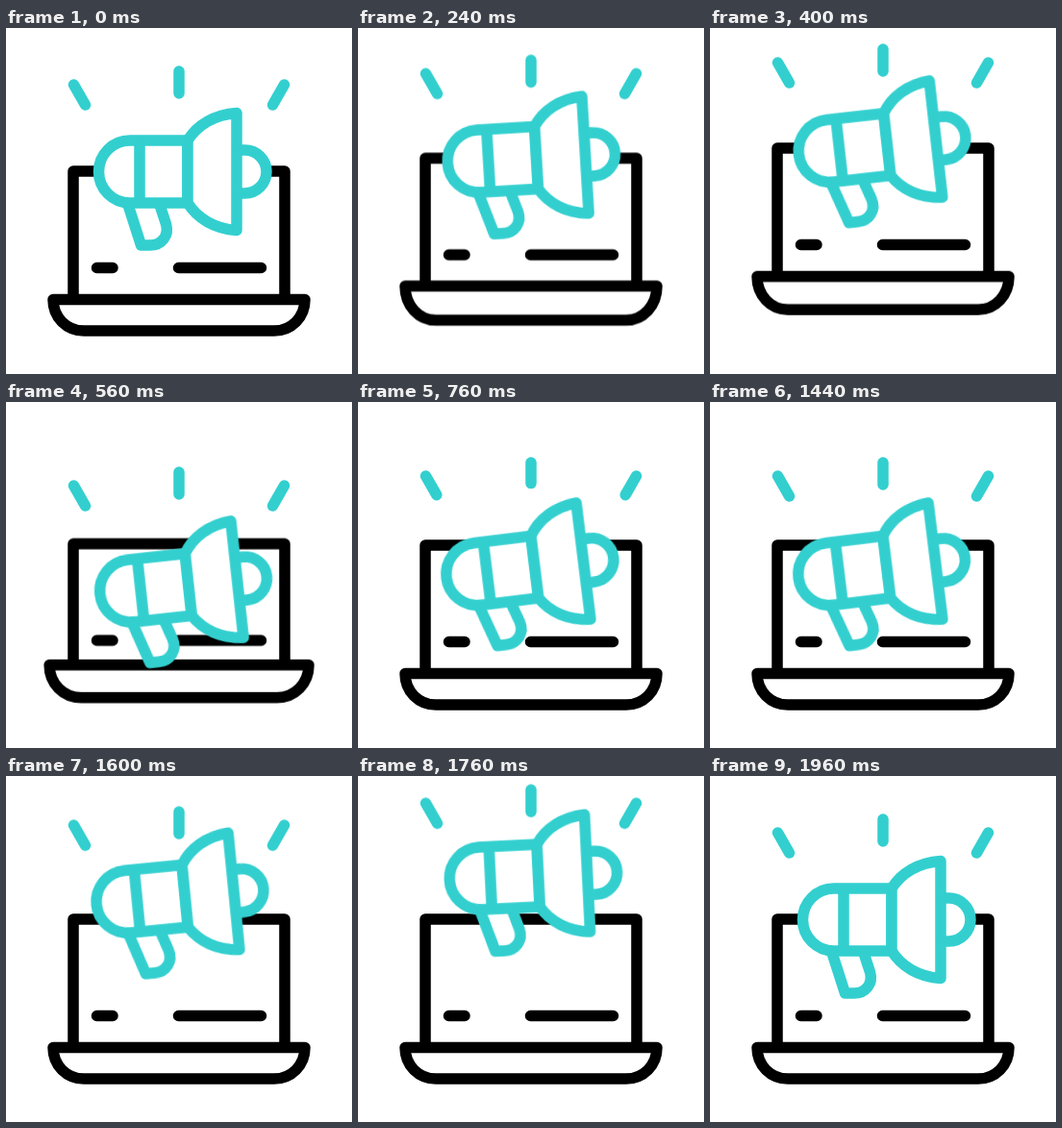
Recreate the animation shown at these times as an HTML page. Size 360 by 360 pixels, loop 2000 ms.

```html
<!DOCTYPE html>
<html lang="en">
<head>
<meta charset="utf-8">
<title>Megaphone and laptop</title>
<style>
  html, body { margin: 0; width: 100%; height: 100%; overflow: hidden; background: #fff; }
  svg { display: block; width: 100vw; height: 100vh; }

  :root {
    --sine: cubic-bezier(.37, 0, .63, 1);
    --in: cubic-bezier(.12, 0, .39, 0);
    --out: cubic-bezier(.61, 1, .88, 1);
  }
  svg * {
    stroke-width: 11.5;
    stroke-linecap: round;
    stroke-linejoin: round;
    animation: 2s var(--sine) infinite;
  }
  .laptop { stroke: #000; fill: #fff; }
  .teal { stroke: #33cfcf; fill: #fff; }

  .screen { animation-name: screen; }
  .base { animation-name: base; transform-origin: 180px 282.5px; vector-effect: non-scaling-stroke; }
  .horn { animation-name: horn; transform-origin: 240px 149.5px; }
  .bump { animation-name: bump; transform-origin: 240px 149.5px; vector-effect: non-scaling-stroke; }
  .rays { animation-name: rays; }
  .rays path { animation-name: shrink; stroke-dasharray: 1 3; }

  @keyframes screen {
    0%, 4% { transform: none; animation-timing-function: var(--in); }
    4% { transform: translateY(0); }
    12% { transform: translateY(-13.5px); animation-timing-function: var(--out); }
    20% { transform: translateY(-24px); }
    28% { transform: translateY(-1.5px); }
    32% { transform: translateY(1px); }
    38%, 100% { transform: translateY(0); }
  }
  @keyframes base {
    0%, 4% { transform: translateY(0) scale(1, 1); animation-timing-function: var(--in); }
    12% { transform: translateY(-14px) scale(1, 1.09); animation-timing-function: var(--out); }
    20% { transform: translateY(-24px) scale(1, 1.06); animation-timing-function: var(--in); }
    28% { transform: translateY(-9px) scale(1.03, 1.045); animation-timing-function: var(--out); }
    32% { transform: translateY(0) scale(1.042, 1.01); }
    38%, 100% { transform: translateY(0) scale(1, 1); }
  }
  @keyframes horn {
    0%, 4% { transform: translate(0, 0) rotate(0deg); animation-timing-function: var(--in); }
    12% { transform: translate(-3.5px, -17.5px) rotate(-3.4deg); animation-timing-function: var(--out); }
    20% { transform: translate(-5px, -34px) rotate(-6.4deg); }
    28% { transform: translate(.5px, 35px) rotate(-6.2deg); }
    36%, 73% { transform: translate(-5.5px, 16px) rotate(-7deg); }
    73% { animation-timing-function: var(--in); }
    80% { transform: translate(-3px, -29.5px) rotate(-5.6deg); animation-timing-function: var(--out); }
    86% { transform: translate(-1.5px, -52px) rotate(-3deg); }
    98%, 100% { transform: translate(0, 0) rotate(0deg); }
  }
  @keyframes bump {
    0%, 36%, 54%, 72%, 100% { transform: scale(1); }
    47%, 65% { transform: scale(1.2); }
  }
  @keyframes rays {
    0%, 4% { transform: translateY(0); }
    20% { transform: translateY(-23px); }
    28% { transform: translateY(28px); }
    36%, 74% { transform: translateY(18px); }
    86% { transform: translateY(-33px); }
    98%, 100% { transform: translateY(0); }
  }
  @keyframes shrink {
    0%, 36%, 54%, 72%, 100% { stroke-dasharray: 1 3; }
    47%, 65% { stroke-dasharray: .25 3; }
  }
</style>
</head>
<body>
<svg viewBox="0 0 360 360">
  <g class="laptop">
    <g class="screen">
      <path d="M70 280V149H290V280"/>
      <path d="M94.5 249.5H111M179.5 249.5H265.5"/>
    </g>
    <path class="base" d="M49 282.5H311C311 301 297 315 279 315H81C63 315 49 301 49 282.5Z"/>
  </g>

  <g class="teal">
    <g class="horn">
      <path class="bump" d="M240 127h8.5a22.5 22.5 0 0 1 0 45h-8.5"/>
      <path d="M127 184L140.5 226H150C162 226 170 216 166.5 204L160 184"/>
      <path d="M189 117H129a32.5 32.5 0 0 0 0 65H189ZM139 117V182"/>
      <path d="M189 117C199 101 217 90 240 88.5V210.5C217 209 199 198 189 182Z"/>
    </g>
    <g class="rays">
      <path pathLength="1" d="M70.5 59L82.5 80"/>
      <path pathLength="1" d="M180 45V68"/>
      <path pathLength="1" d="M289.5 59L277.5 80"/>
    </g>
  </g>
</svg>
</body>
</html>
```
